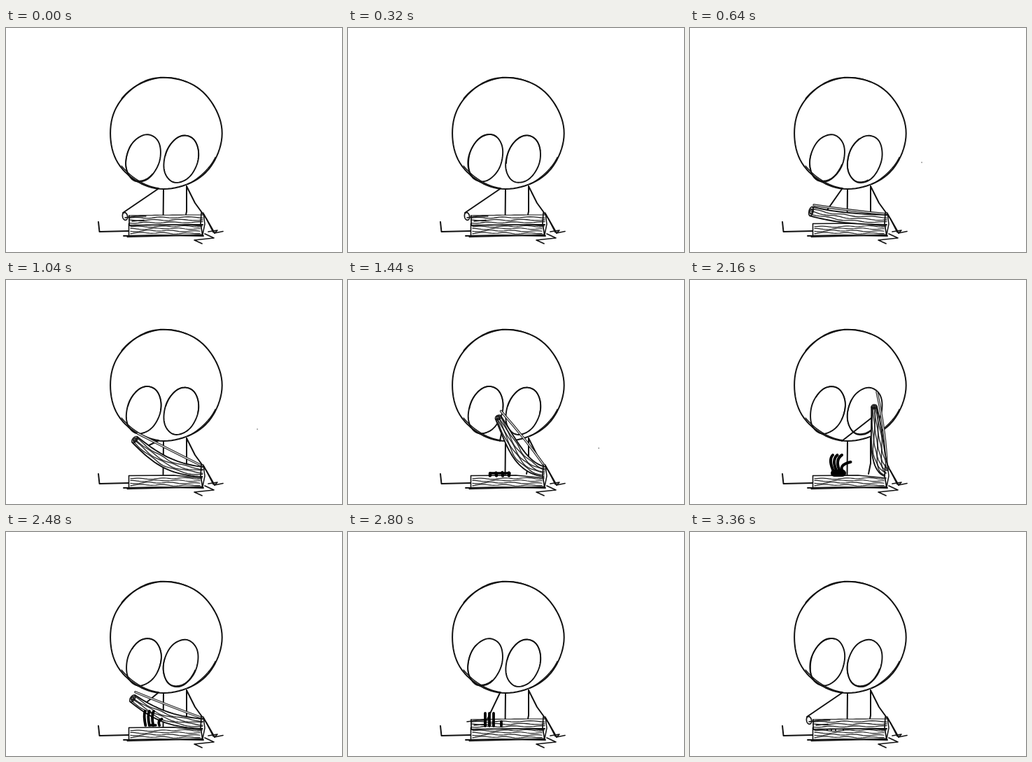
An HTML page with a canvas for the animation above (3.44 s loop, 480 by 320 pixels).

```html
<!DOCTYPE html>
<html lang="en">
<head>
<meta charset="utf-8">
<title>Figure with a box</title>
<style>
html, body { margin: 0; width: 100%; height: 100%; overflow: hidden; background: #fff; }
canvas { display: block; width: 480px; height: 320px; }
</style>
</head>
<body>
<canvas id="stage" width="480" height="320"></canvas>
<script>
const LOOP = 3440, STEP = 80, INK = '#111', TAU = Math.PI * 2;
const g = document.getElementById('stage').getContext('2d');
g.lineJoin = g.lineCap = 'round';

const mix = (a, b, k) => a + (b - a) * k;
const ramp = (t, from, to) => Math.max(0, Math.min(1, (t - from) / (to - from)));
const noise = n => { const v = Math.sin(n * 127.1 + 3.7) * 43758.5453; return (v - Math.floor(v)) * 2 - 1; };

function stroke(draw, width = 2, color = INK) {
  g.beginPath();
  draw();
  g.lineWidth = width;
  g.strokeStyle = color;
  g.stroke();
}

const line = (p, width, color) => stroke(() => {
  for (let i = 0; i < p.length; i += 2) g.lineTo(p[i], p[i + 1]);
}, width, color);

// Slightly uneven hand-drawn ellipse or arc
function oval(cx, cy, rx, ry, tilt, seed, width, from = 0, to = TAU) {
  const c = Math.cos(tilt), s = Math.sin(tilt);
  stroke(() => {
    for (let k = 0; k <= 90; k++) {
      const a = mix(from, to, k / 90);
      const r = 1 + 0.006 * Math.sin(3 * a + seed) + 0.004 * Math.sin(7 * a + 2 * seed);
      const u = rx * r * Math.cos(a), v = ry * r * Math.sin(a);
      g.lineTo(cx + u * c - v * s, cy + u * s + v * c);
    }
  }, width);
}

// The lid is a strip bending around its hinge; only its free end is keyed
const HINGE = { x: 281, y: 274 };
const TIPS = [[176, 275], [173, 262], [184, 228], [239, 171], [263, 181]];

function lidPose(t) {
  const open = t < 2160
    ? ramp(t, 320, 640) + ramp(t, 640, 1040) + ramp(t, 1040, 1760) + ramp(t, 1760, 2160)
    : 4 * (1 - ramp(t, 2160, 2720));
  const i = Math.min(3, Math.floor(open));
  const [x, y] = TIPS[i].map((v, j) => mix(v, TIPS[i + 1][j], open - i));
  const rise = Math.max(0, HINGE.y - y), up = rise / 103;
  const px = [HINGE.x, mix(HINGE.x, x, 0.42) - rise * 0.08, mix(HINGE.x, x, 0.68), x];
  const py = [HINGE.y, mix(HINGE.y, y, 0.08), mix(HINGE.y, y, 0.25 + rise * 0.003), y];

  const bez = (p, s) => (1 - s) ** 3 * p[0] + 3 * s * (1 - s) ** 2 * p[1] + 3 * s * s * (1 - s) * p[2] + s ** 3 * p[3];
  const slope = (p, s) => (1 - s) ** 2 * (p[1] - p[0]) + 2 * s * (1 - s) * (p[2] - p[1]) + s * s * (p[3] - p[2]);

  // s runs from hinge to free end, side from -1 (lower edge) to 1 (upper edge)
  const point = (s, side) => {
    const dx = slope(px, s), dy = slope(py, s), d = Math.hypot(dx, dy);
    const half = mix(7, mix(7, 3.5, up), s) + up * 4 * Math.sin(Math.PI * s);
    return [bez(px, s) - dy / d * half * side, bez(py, s) + dx / d * half * side * -1]
      .map((v, j) => j ? v : 2 * bez(px, s) - v);
  };
  return { open, up, x, y, point };
}

function drawFigure(step, t, lid) {
  oval(228.2, 150.5, 79.8, 79.6, 0, 1, 2);
  oval(228.2, 150, 78.6, 80, 0, 2.4, 1.4, 0.45, 1.15);
  oval(228.2, 150, 79, 79, 0, 4, 1.4, 1.7, 2.5);
  oval(228.2, 150.5, 79.2, 80, 0, 3, 1.4, 3.8, 5.1);

  for (const side of [0, 1]) {
    const k = noise(step + 60 * side);
    const x = mix(196.4, 250, side) + 0.5 * k, y = mix(185.8, 187.3, side);
    oval(x, y, 23.6, 34.6, 0.32, k * 3, 1.9);
    oval(x + 0.6 * k, y - 0.5, 23.2, 34.2, 0.3, k + 2, 1.5, 2 + 2 * k, 5 + 2 * k);
  }

  line([225, 230, 224.5, 278]);
  line([258, 226, 258, 262, 255, 277]);

  const hold = ramp(t, 320, 480) * (1 - ramp(t, 2800, 3200));
  const [hx, hy] = lid.point(0.8 + 0.12 * lid.up, 0);
  const ax = mix(167, hx, hold), ay = mix(264, hy, hold);
  line([217, 230, ax, ay]);
  if (hold < 0.2) oval(ax + 3, ay + 5, 3.5, 5.5, -0.2, 1, 1.7);

  line([258, 226, 270, 250, 286, 272, 298, 293]);
  line([283, 266, 296, 292], 1.5);
  line([289, 291, 302, 289, 298, 293, 310, 290.5], 1.7);
  line([132, 277, 133.5, 291, 176, 290]);
  line([284, 294, 297, 300, 269, 303, 280, 308], 1.7);
}

function drawBox() {
  g.fillStyle = '#fff';
  g.fillRect(175, 280, 105, 17);
  line([175.5, 297, 175.5, 279.5, 240, 279, 280, 283], 1.6);
  for (let k = 0; k < 4; k++) {
    stroke(() => {
      for (let x = 178; x < 279; x += 3) {
        g.lineTo(x, 283.5 + 3.2 * k + 0.7 * Math.sin(x * 0.19 + k * 2) + 0.5 * Math.sin(x * 0.07 + k));
      }
    }, 1.2, '#222');
  }
  line([168, 297, 220, 296, 282, 297], 1.9);
  line([173, 298.5, 230, 297, 281, 295], 1.3);
}

function drawLid(lid) {
  const { open, up, x, y, point } = lid;
  const trace = (side, wave = 0, back = false) => {
    for (let k = 0; k <= 24; k++) {
      const s = (back ? 24 - k : k) / 24;
      g.lineTo(...point(s, side + wave * Math.sin(s * 17 + side * 9)));
    }
  };

  if (open > 0.5) {
    const cover = () => {
      g.moveTo(x + 4, y - 9 - 12 * Math.max(0, open - 3));
      g.quadraticCurveTo((x + HINGE.x) / 2 + 9 * up, (y + HINGE.y) / 2 - 7, HINGE.x, HINGE.y - 8);
    };
    stroke(cover, 3.4, '#222');
    stroke(cover, 1.1, '#fff');
  }

  g.beginPath();
  trace(1);
  trace(-1, 0, true);
  g.fillStyle = '#fff';
  g.fill();

  const rows = 3 + Math.round(up * 3);
  for (let k = 1; k <= rows; k++) stroke(() => trace(2 * k / (rows + 1) - 1, 0.12), 1.3, '#222');
  stroke(() => trace(1), 1.9);
  stroke(() => trace(-1), open ? 1.9 : 1.1);

  const a = point(1, -1), b = point(1, 1);
  if (open > 0.2) {
    const r = Math.hypot(b[0] - a[0], b[1] - a[1]) / 2, turn = Math.atan2(b[1] - a[1], b[0] - a[0]);
    for (const size of [1, 0.5]) stroke(() => g.ellipse(x, y, r * size, 3 * size, turn, 0, TAU), 1.6);
  } else {
    line([...a, ...b], 1.7);
    line([170, 271, 185, 269, 200, 269], 1.6);
    line([180, 276, 197, 274.5], 1.6);
  }
  line([279, 264, 278, 280, 281, 297], 1.7);
  line([282, 264, 284, 280, 281, 295], 1.5);
}

// A dark hand rises as a lump, curls its fingers, grips the lid and slips away
function drawHand(t) {
  const rise = ramp(t, 1280, 1700), sink = ramp(t, 2800, 3280);
  const curl = ramp(t, 1760, 2160), grip = ramp(t, 2160, 2640);
  if (!rise) return;
  const pose = (lump, claw, held) => mix(mix(lump, claw, curl), held, grip);
  const size = rise * (1 - sink);
  const base = mix(mix(281, pose(277, 275, 277), rise), 283, sink);

  for (let i = 0; i < 4; i++) {
    const thumb = i === 3;
    const x = pose(203 + 9 * i, 206 + 4.5 * i, 196 + 6 * i + (thumb ? 5 : 0));
    const tall = size * pose(10 + 2 * noise(i), thumb ? 15 : 25, thumb ? 6 : 18);
    const bend = size * pose(noise(i + 9), -9, 0);
    const reach = size * pose(2 * noise(i + 4), thumb ? 10 : 2 * i - 2, 0);
    stroke(() => {
      g.moveTo(x, base);
      g.quadraticCurveTo(x + bend, base - tall * 0.7, x + reach, base - tall);
    }, mix(2, pose(8.5, 4, 3.8), size), '#000');
  }
  const palm = size * pose(9, 10, 0);
  if (palm > 0.5) line([pose(203, 206, 206), 276, pose(231, 218, 212), 276], palm, '#000');
}

function drawSpeck(t) {
  if (t < 640 || t > 1920) return;
  const d = t - 640;
  g.fillStyle = '#555';
  g.fillRect(330.4 + 0.106 * d - 9e-5 * d * d, 191.4 + 0.045 * d + 1.9e-5 * d * d, 1.3, 1.3);
}

function render(now) {
  const step = Math.floor(now % LOOP / STEP), t = step * STEP;
  const lid = lidPose(t);
  g.fillStyle = '#fff';
  g.fillRect(0, 0, 480, 320);
  drawFigure(step, t, lid);
  drawBox();
  drawLid(lid);
  drawHand(t);
  drawSpeck(t);
}

const start = performance.now();
function tick() {
  render(performance.now() - start);
  requestAnimationFrame(tick);
}
tick();
</script>
</body>
</html>
```
